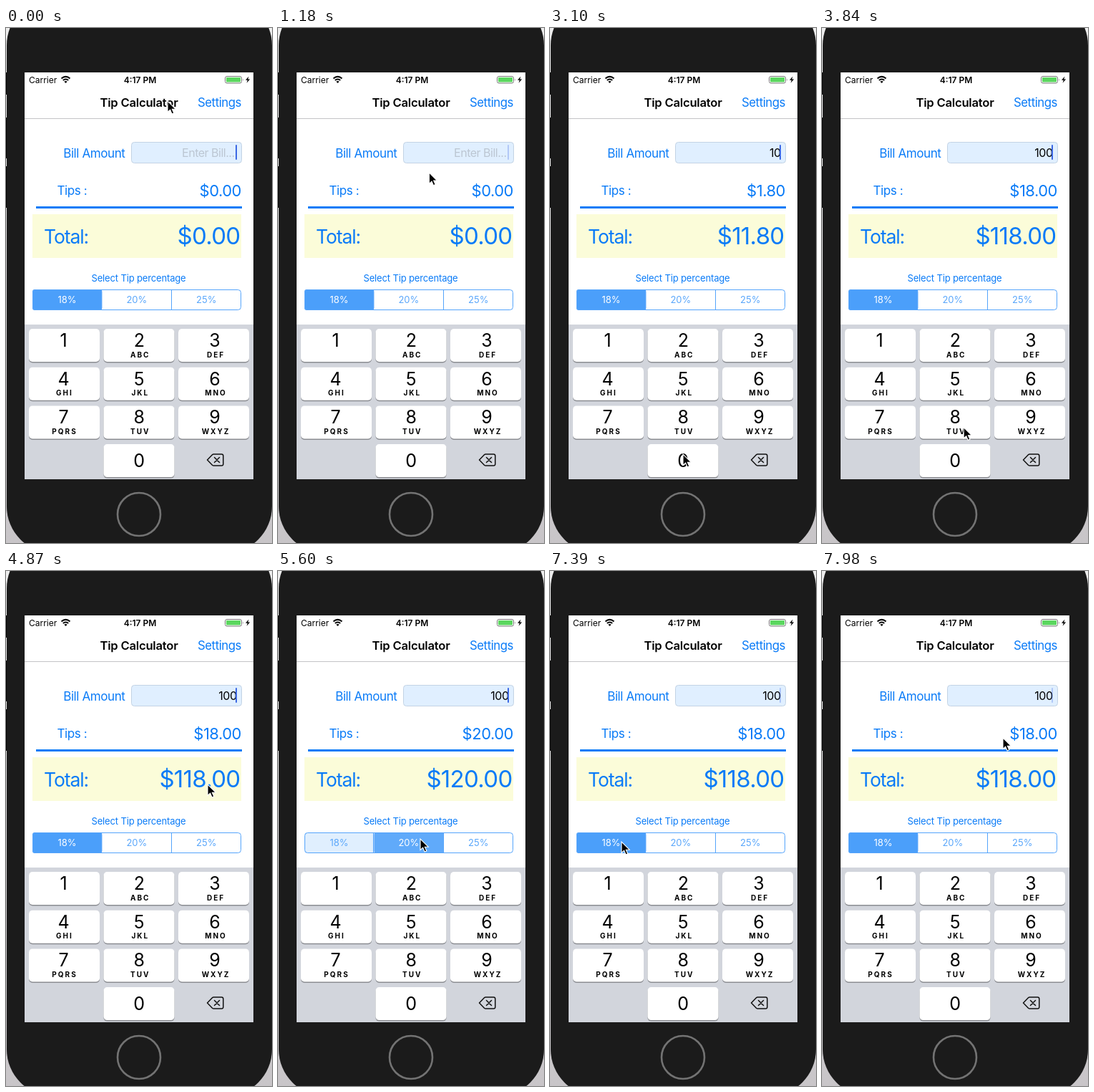
Write an HTML page that moves like this. It is 372 px wide and 719 px high and loops after 8000 ms.

```html
<!DOCTYPE html>
<html lang="en">
<head>
<meta charset="utf-8">
<title>Tip Calculator</title>
<style>
  html, body { margin: 0; width: 100%; height: 100%; overflow: hidden; background: #1b1b1b; }
  svg { display: block; width: 372px; height: 719px; font-family: Inter, Roboto, sans-serif; }
  .blue { fill: #0a7bf7; }
  .body { font-size: 17px; letter-spacing: -.4px; }
  .end { text-anchor: end; }
  .mid { text-anchor: middle; }
  .status { font-size: 12px; }
  .entry { font-size: 16px; letter-spacing: -.5px; }
  .segment { font-size: 13px; }
  .digit { font-size: 25px; }
  .letters { font-size: 10px; font-weight: 700; letter-spacing: 2px; }
</style>
</head>
<body>
<svg viewBox="0 0 372 719" xmlns="http://www.w3.org/2000/svg">
  <defs>
    <linearGradient id="desk" x2="0" y2="1">
      <stop offset="0" stop-color="#eee"/>
      <stop offset="1" stop-color="#c8c5c8"/>
    </linearGradient>
  </defs>

  <!-- Phone -->
  <rect width="372" height="719" fill="url(#desk)"/>
  <rect x="1" y="-41" width="371" height="774" rx="65" fill="#1b1b1b"/>
  <path d="M.5 62v31M.5 125v57M.5 193v58" stroke="#000"/>
  <circle cx="186" cy="679" r="30" fill="none" stroke="#737373" stroke-width="2.6"/>
  <rect x="26" y="62" width="320" height="568" fill="#fff"/>

  <!-- Status and navigation bars -->
  <text class="status" x="32" y="76.5">Carrier</text>
  <g fill="none" stroke="#000" stroke-width="2">
    <path d="M77.5 70.4q6-5 12 0M79.8 73q3.700-3 7.400 0"/>
  </g>
  <path d="M81.300 74.800q2.200-1.600 4.400 0l-2.200 2.300z"/>
  <text class="status mid" x="187.5" y="76.5" font-weight="600">4:17 PM</text>
  <rect x="306.500" y="67.500" width="23" height="9.500" rx="2.500" fill="#fff" stroke="#777"/>
  <rect x="308" y="69" width="20" height="6.500" rx="1" fill="#5bd75f"/>
  <path d="M331 70.500q1.500 1.700 0 3.500z" fill="#777"/>
  <path d="M339.500 67.500l-4.500 5.300h2.800l-1.300 4 4.700-5.400h-2.900z"/>
  <text class="mid" x="186" y="110" font-size="16.6" font-weight="600" letter-spacing="-.2">Tip Calculator</text>
  <text class="blue end" x="329" y="110" font-size="16.8" letter-spacing="-.45">Settings</text>
  <path d="M26 126.500h320" stroke="#c4c4c6"/>

  <!-- Bill form -->
  <text class="body blue end" x="166.500" y="181">Bill Amount</text>
  <rect x="175.500" y="159.500" width="154" height="29" rx="4" fill="#e0efff" stroke="#c3d3e4"/>
  <text id="placeholder" class="entry end" x="319.500" y="179.500" fill="#bcc6d2">Enter Bill...</text>
  <text id="bill" class="entry end" x="322.500" y="179.500"></text>
  <rect id="caret" x="321" y="163" width="2" height="21" rx="1" fill="#3c68e4"/>
  <text class="body blue" x="71.500" y="233">Tips :</text>
  <text id="tip" class="blue end" x="329" y="235" font-size="22" letter-spacing="-.5"></text>
  <rect x="42" y="249" width="288" height="3" class="blue"/>
  <rect x="37" y="260" width="292" height="61" fill="#fbfcd9"/>
  <text class="blue" x="53" y="300.500" font-size="26.5" letter-spacing="-1.1">Total:</text>
  <text id="total" class="blue end" x="327.500" y="302" font-size="33" letter-spacing="-.7"></text>
  <text class="blue mid" x="185.500" y="353.500" font-size="13" letter-spacing="-.15">Select Tip percentage</text>

  <g id="segments"></g>
  <rect x="37.500" y="365.500" width="291" height="28" rx="4" fill="none" stroke="#55a4fb"/>
  <path d="M133.500 366v27M231.500 366v27" stroke="#55a4fb"/>

  <!-- Keypad -->
  <rect x="26" y="414" width="320" height="216" fill="#d2d5dc"/>
  <g id="keys"></g>
  <g fill="none" stroke="#111" stroke-width="1.500" stroke-linejoin="round" stroke-linecap="round">
    <path d="M281.500 603l7-7.200q.8-.8 2-.8h11q2.300 0 2.300 2.300v11.400q0 2.300-2.300 2.300h-11q-1.200 0-2-.8z"/>
    <path d="M291.500 599.500l7 7m0-7l-7 7"/>
  </g>

  <path id="pointer" d="M0 0v15.500l3.600-3.300 2.500 5.700 2.700-1.200-2.500-5.500h4.900z" stroke="#fff" stroke-width="1.100"/>
</svg>
<script>
const $ = id => document.getElementById(id);
const LOOP = 8000, STEP = 147.7;
const RATES = [18, 20, 25];
const LETTERS = ['', 'ABC', 'DEF', 'GHI', 'JKL', 'MNO', 'PQRS', 'TUV', 'WXYZ'];

// All step numbers count screen refreshes of STEP milliseconds.
const KEY_TAPS = [[14, '1'], [20, '0'], [23, '0']];
const RATE_TAPS = [[37, 1], [41, 2], [48, 0]];
const PATH = [
  [0, 226, 102], [6, 228, 173], [7, 228, 173], [12, 68, 451], [13, 68, 451],
  [14, 115, 476], [15, 150, 537], [16, 150, 537], [19, 186, 595], [24, 186, 595],
  [33, 282, 298], [36, 200, 372], [38, 199, 374], [42, 246, 379], [44, 246, 379],
  [47, 100, 378], [50, 100, 378], [53, 222, 266], [54, 253, 233]
];

function keyMarkup(label, index) {
  const column = label === '0' ? 1 : index % 3;
  const row = Math.floor(index / 3);
  const x = 32 + column * 104.5, y = 420 + row * 53.7;
  const center = 80.5 + column * 105.75;
  const letters = LETTERS[index] || '';
  return `<rect x="${x}" y="${y + 1}" width="99" height="46.5" rx="5" fill="#8b8d92"/>
    <rect id="key${label}" x="${x}" y="${y}" width="99" height="46" rx="5"/>
    <text class="digit mid" x="${center}" y="${y + (label === '0' ? 32 : 25)}">${label}</text>
    <text class="letters mid" x="${center + 1.5}" y="${y + 39.5}">${letters}</text>`;
}

$('keys').innerHTML = [...'1234567890'].map(keyMarkup).join('');
$('segments').innerHTML = RATES.map((rate, i) => {
  const x = 37 + i * 97.4;
  return `<rect id="fill${i}" x="${x}" y="365" width="97.4" height="29" rx="3" fill="#4b9ffa"/>
    <text id="rate${i}" class="segment mid" x="${x + 48.5}" y="384">${rate}%</text>`;
}).join('');

const clamp = v => Math.max(0, Math.min(1, v));
const money = v => '$' + v.toFixed(2);

function pointerAt(step) {
  const next = PATH.findIndex(p => p[0] >= step);
  const to = PATH[next < 0 ? PATH.length - 1 : next];
  const from = PATH[Math.max(0, next - 1)];
  const u = to === from || next < 0 ? 1 : (step - from[0]) / (to[0] - from[0]);
  const eased = u * u * (3 - 2 * u);
  return [1, 2].map(k => from[k] + (to[k] - from[k]) * eased);
}

function caretOpacity(seconds) {
  const phase = seconds % 1;
  return phase < .7 ? clamp((.46 - phase) / .1) : clamp((phase - .8) / .13);
}

function drawSegments(step) {
  const fill = [1, 0, 0];
  let selected = 0;
  for (const [tap, target] of RATE_TAPS) {
    if (step < tap) break;
    const age = step - tap;
    fill[target] = [.17, .88][age] ?? 1;
    fill[selected] = [1, .17][age] ?? 0;
    if (age > 0) selected = target;
  }
  fill.forEach((opacity, i) => {
    $('fill' + i).setAttribute('opacity', opacity);
    $('rate' + i).setAttribute('fill', opacity > .5 ? '#fff' : '#5aa7fb');
  });
  return RATES[selected];
}

function draw(time) {
  const step = Math.floor((time + 15) / STEP);
  const typed = KEY_TAPS.filter(([tap]) => step > tap);
  const text = typed.map(([, digit]) => digit).join('');
  const pressed = KEY_TAPS.find(([tap]) => tap === step);
  for (const digit of '1234567890')
    $('key' + digit).setAttribute('fill', pressed && pressed[1] === digit ? '#b7c5d2' : '#fff');

  const tip = text * drawSegments(step) / 100;
  $('bill').textContent = text;
  $('placeholder').setAttribute('opacity', text ? 0 : 1);
  $('tip').textContent = money(tip);
  $('total').textContent = money(+text + tip);

  const lastTyped = typed.length ? (typed.at(-1)[0] + 1) * STEP : -250;
  $('caret').setAttribute('opacity', caretOpacity((step * STEP - lastTyped) / 1000));
  $('pointer').setAttribute('transform', `translate(${pointerAt(step)})`);
}

const start = performance.now();
function tick() {
  draw((performance.now() - start) % LOOP);
  requestAnimationFrame(tick);
}
tick();
</script>
</body>
</html>
```
